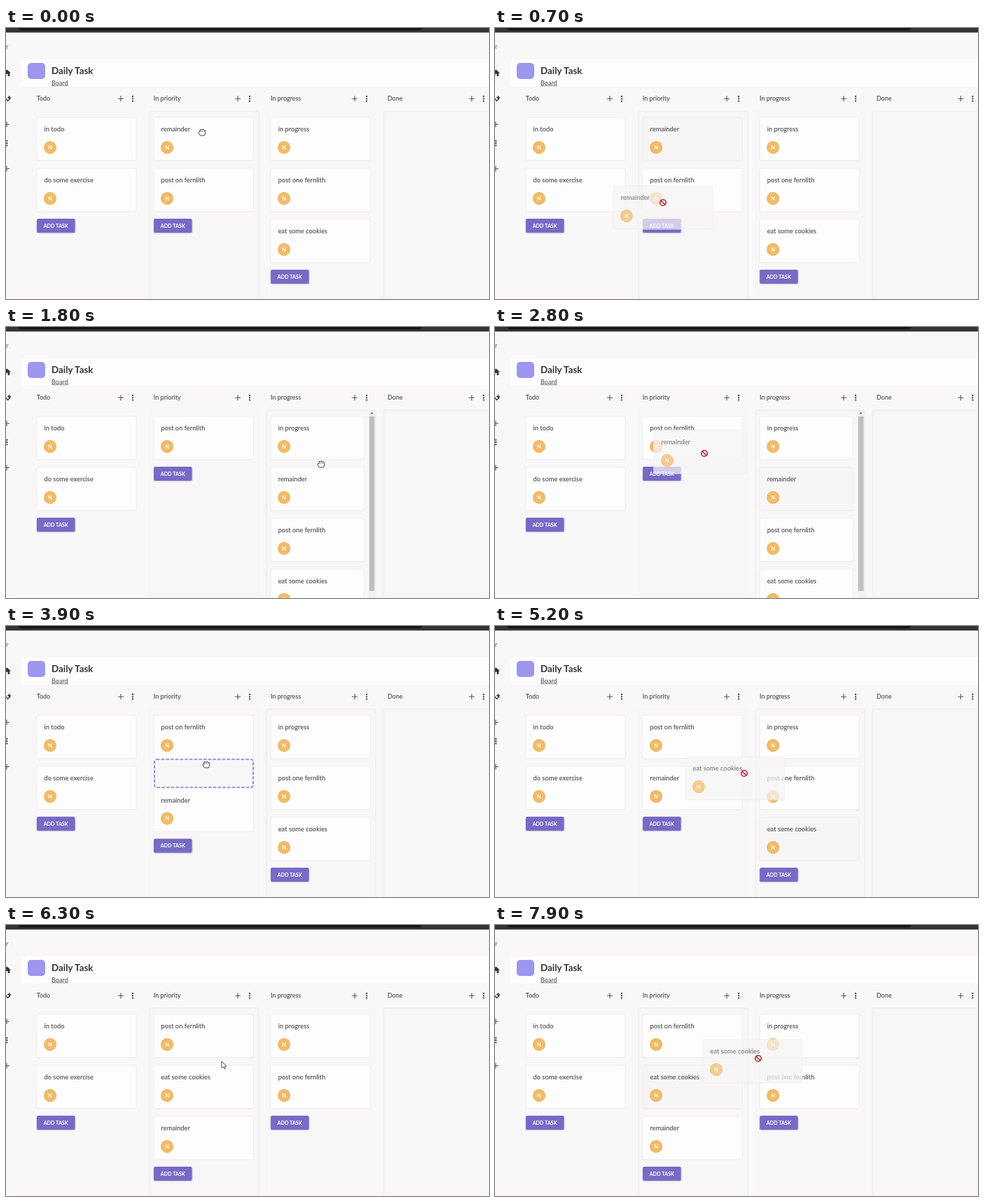
These frames come from a looping animation (690x388 px, 8000 ms). An HTML page:

```html
<!DOCTYPE html>
<html lang="en">
<head>
<meta charset="utf-8">
<title>Task board</title>
<style>
  html, body { margin: 0; width: 100%; height: 100%; overflow: hidden; background: #f9f7f8; }
  svg { display: block; width: 690px; height: 388px; font-family: Lato, "Open Sans", sans-serif; }
</style>
</head>
<body>
<svg id="stage" viewBox="0 0 690 388">
  <rect width="690" height="388" fill="#f9f7f8"/>
  <rect width="690" height="6.5" fill="#343234"/>
  <path d="M17 0H595Q593 3.5 588 3.5H24Q19 3.5 17 0Z" fill="#171617"/>
  <rect x="22" y="45" width="668" height="39" fill="#fefdfe"/>
  <rect x="31" y="50" width="25" height="23" rx="5" fill="#9d96ee"/>
  <text x="65" y="66" font-size="13.4" font-weight="700" fill="#353335">Daily Task</text>
  <text x="65" y="81.5" font-size="9" font-weight="500" fill="#555">Board</text>
  <path d="M65 82.8H89" stroke="#777" stroke-width=".8"/>
  <text x="0" y="30" font-size="9.5" fill="#666">r</text>
  <g fill="#353335">
    <path d="M-4 64.5L1.5 59.5L7 64.5H5.3V69H2.7V65.8H.3V69H-3V64.5Z"/>
    <path d="M4.5 96.5L5.4 98.6L7.5 99.5L5.4 100.4L4.5 102.5L3.6 100.4L1.5 99.5L3.6 98.6Z"/>
  </g>
  <path d="M-1 100L2.5 104.5L6.5 100.5" fill="none" stroke="#353335" stroke-width="1.3"/>
  <g id="side"></g>
  <g id="board"></g>
</svg>
<script>
const LOOP = 8000, STEP = 100;
const TOP = 128, PITCH = 73, CARD_W = 142;
const COLUMNS = ['Todo', 'In priority', 'In progress', 'Done'];
const columnX = i => 44 + 167.1 * i;

const todo = ['in todo', 'do some exercise'];
const REM = 'remainder', POST = 'post on fernlith', EAT = 'eat some cookies';
const prog = ['in progress', 'post one fernlith'];

const before = { pri: [REM, POST], prog: [...prog, EAT], active: 1 };
const moved = { pri: [POST], prog: [prog[0], REM, prog[1], EAT], active: 1 };
const returned = { pri: [POST, REM], prog: [...prog, EAT], active: 2 };
const sorted = { pri: [POST, EAT, REM], prog, active: 1 };

// slot: [column, row, gap]; drag: title, card [column, row] and grip within it
const drag1 = { title: REM, from: [1, 0], grip: [71, 24], width: CARD_W };
const drag2 = { title: REM, from: [2, 1], grip: [72, 33], width: 133 };
const drag3 = { title: EAT, from: [2, 2], grip: [84, 24], width: CARD_W };
const drag4 = { title: EAT, from: [1, 1], grip: [79, 27], width: CARD_W };
const priSlot = [1, 1, 31.5], progSlot = [2, 1, 33];
const scrolled = { ...moved, active: 2, scroll: true };

const SCENES = [
  [0, { ...before, cursor: 'hand' }],
  [100, { ...before, drag: drag1, cursor: 'deny' }],
  [1000, { ...before, drag: drag1, slot: progSlot, cursor: 'copy' }],
  [1500, { ...moved, slot: progSlot, cursor: 'hand' }],
  [1800, { ...scrolled, cursor: 'hand' }],
  [2500, { ...scrolled, drag: drag2, cursor: 'deny' }],
  [3400, { ...scrolled, drag: drag2, slot: priSlot, cursor: 'copy' }],
  [3800, { ...returned, slot: priSlot, cursor: 'hand' }],
  [4100, { ...returned, cursor: 'hand' }],
  [5000, { ...returned, drag: drag3, cursor: 'deny' }],
  [5600, { ...returned, drag: drag3, slot: priSlot, cursor: 'copy' }],
  [5900, { ...sorted, slot: priSlot, cursor: 'hand' }],
  [6200, { ...sorted, cursor: 'arrow' }],
  [7300, { ...sorted, cursor: 'hand' }],
  [7900, { ...sorted, drag: drag4, cursor: 'deny' }]
];

const PATH = [
  [0, 280, 149], [300, 220, 175], [500, 125, 205], [700, 240, 250], [900, 375, 235],
  [1200, 450, 196], [1900, 450, 196], [2300, 450, 234], [2400, 450, 234],
  [2800, 299, 181], [3300, 290, 190], [3700, 286, 198], [4200, 286, 198],
  [4600, 460, 296], [4900, 460, 296], [5200, 356, 211], [5500, 318, 203],
  [5800, 311, 201], [6200, 308, 195], [7200, 308, 195], [7600, 290, 228],
  [7800, 290, 228], [7900, 376, 191], [8000, 376, 191]
];

function pointerAt(t) {
  const i = PATH.findIndex(key => key[0] > t);
  const [t0, x0, y0] = PATH[i - 1], [t1, x1, y1] = PATH[i];
  const k = (t - t0) / (t1 - t0);
  return [x0 + (x1 - x0) * k, y0 + (y1 - y0) * k];
}

const sceneAt = t => SCENES.filter(([start]) => start <= t).pop()[1];

const text = (x, y, size, label, fill = '#454345', extra = 'font-weight="500"') =>
  `<text x="${x}" y="${y}" font-size="${size}" fill="${fill}" ${extra}>${label}</text>`;

const box = (x, y, w, h, r, attrs) =>
  `<rect x="${x}" y="${y}" width="${w}" height="${h}" rx="${r}" ${attrs}/>`;

const plus = (x, y) =>
  `<path d="M${x - 4} ${y}h8M${x} ${y - 4}v8" stroke="#555355" stroke-width="1.1"/>`;

const dots = (x, y) => [-3.3, 0, 3.3]
  .map(d => `<circle cx="${x}" cy="${y + d}" r="1.15" fill="#353335"/>`).join('');

function card(x, y, title, width = CARD_W, dim = false) {
  const fill = dim ? '#f7f5f6' : '#fefdfe';
  return box(x - 1, y - 1, width + 2, 64, 4, 'fill="#f1eff0" opacity=".7"') +
    box(x, y, width, 61.5, 3, `fill="${fill}" stroke="#f1eff0" stroke-width=".8"`) +
    text(x + 10.5, y + 20, 9.3, title) +
    `<circle cx="${x + 19}" cy="${y + 43}" r="9.2" fill="#f0bb69"/>` +
    text(x + 19, y + 45.7, 7.6, 'N', '#fffaf0', 'font-weight="700" text-anchor="middle"');
}

function button(x, y) {
  return box(x - .5, y + .8, 56, 20.5, 2.5, 'fill="#cbc7dc"') +
    box(x, y, 54.5, 20, 2, 'fill="#766ac5"') +
    text(x + 27.2, y + 12.7, 7.2, 'ADD TASK', '#fff', 'font-weight="700" text-anchor="middle"');
}

const slotBox = (x, row) => box(x + 1, TOP + PITCH * row - 10, CARD_W - 1, 40, 3,
  'fill="#f8f6f7" stroke="#8a7fd6" stroke-width="1.7" stroke-dasharray="4.5 2.2"');

function scrollbar() {
  return box(518, 118, 9, 270, 0, 'fill="#f2f0f1"') +
    box(519, 128, 7.5, 250, 0, 'fill="#c0bec0"') +
    '<path d="M520.5 124.5L522.7 121.8L525 124.5Z" fill="#777"/>';
}

function column(i, scene) {
  const x = columnX(i), titles = [todo, scene.pri, scene.prog, []][i];
  const tinted = i === 3 || i === scene.active;
  const scroll = scene.scroll && i === 2;
  const slot = scene.slot && scene.slot[0] === i ? scene.slot : null;
  const source = scene.drag && scene.drag.from;
  const shift = row => slot && row >= slot[1] ? slot[2] : 0;
  let out = '';
  if (i) {
    const look = tinted ? 'fill="#f8f6f7" stroke="#f2f0f1" stroke-width="2"' : 'fill="#f8f6f7" stroke="#f6f4f5"';
    out += box(x - 6, 119, 156, 280, 3, look);
  }
  out += text(x - .3, 104.3, 9, COLUMNS[i]) + plus(x + 120, 101.3) + dots(x + 137, 101.3);
  titles.forEach((title, row) => {
    const dim = source && source[0] === i && source[1] === row;
    out += card(x, TOP + PITCH * row + shift(row), title, scroll ? 133 : CARD_W, dim);
  });
  if (slot) out += slotBox(x, slot[1]);
  if (i < 3) out += button(x, TOP - 1 + PITCH * titles.length + shift(titles.length));
  return out + (scroll ? scrollbar() : '');
}

const ARROW = '<path d="M0 0V10L2.4 7.8L4 11.2L5.6 10.4L4 7.1H7Z" fill="#fff" stroke="#444" stroke-width=".9"/>';
const CURSORS = {
  arrow: ARROW,
  copy: ARROW + box(4.5, 9.5, 6.5, 6.5, 0, 'fill="#fff" stroke="#444" stroke-width=".9"') +
    '<path d="M6 12.8H9.6M7.8 11V14.6" stroke="#444"/>',
  deny: '<circle r="4.3" fill="#fff" fill-opacity=".7" stroke="#b51f35" stroke-width="1.6"/>' +
    '<path d="M-3 -3L3 3" stroke="#b51f35" stroke-width="1.6"/>',
  hand: '<path d="M-2.5 5L-4.7 1.5Q-5.5 -.5 -3.5 -.5L-3 .2V-3Q-2 -4.6 -1 -3.2Q0 -5.2 1 -3.3' +
    'Q2.4 -4.6 3 -2.6Q4.8 -3 4.8 -1V2L3.4 5Z" fill="#fff" stroke="#444" stroke-width="1"/>' +
    '<path d="M-1 -3V0M1 -3V0M3 -2.5V0" stroke="#666" stroke-width=".7"/>'
};

function render(t) {
  const scene = sceneAt(t), [x, y] = pointerAt(t), drag = scene.drag;
  let out = COLUMNS.map((_, i) => column(i, scene)).join('');
  if (drag) {
    const ghost = card(x - drag.grip[0], y - drag.grip[1], drag.title, drag.width, true);
    out += `<g opacity=".72">${ghost}</g>`;
  }
  out += `<g transform="translate(${x} ${y})">${CURSORS[scene.cursor]}</g>`;
  document.getElementById('board').innerHTML = out;
}

document.getElementById('side').innerHTML = plus(1, 138) + dots(1.3, 165) + plus(1, 201.5);

const start = performance.now();
let shown = -1;
function tick() {
  const elapsed = (performance.now() - start) % LOOP;
  const t = Math.floor(elapsed / STEP) * STEP;
  if (t !== shown) render(shown = t);
  requestAnimationFrame(tick);
}
tick();
</script>
</body>
</html>
```
